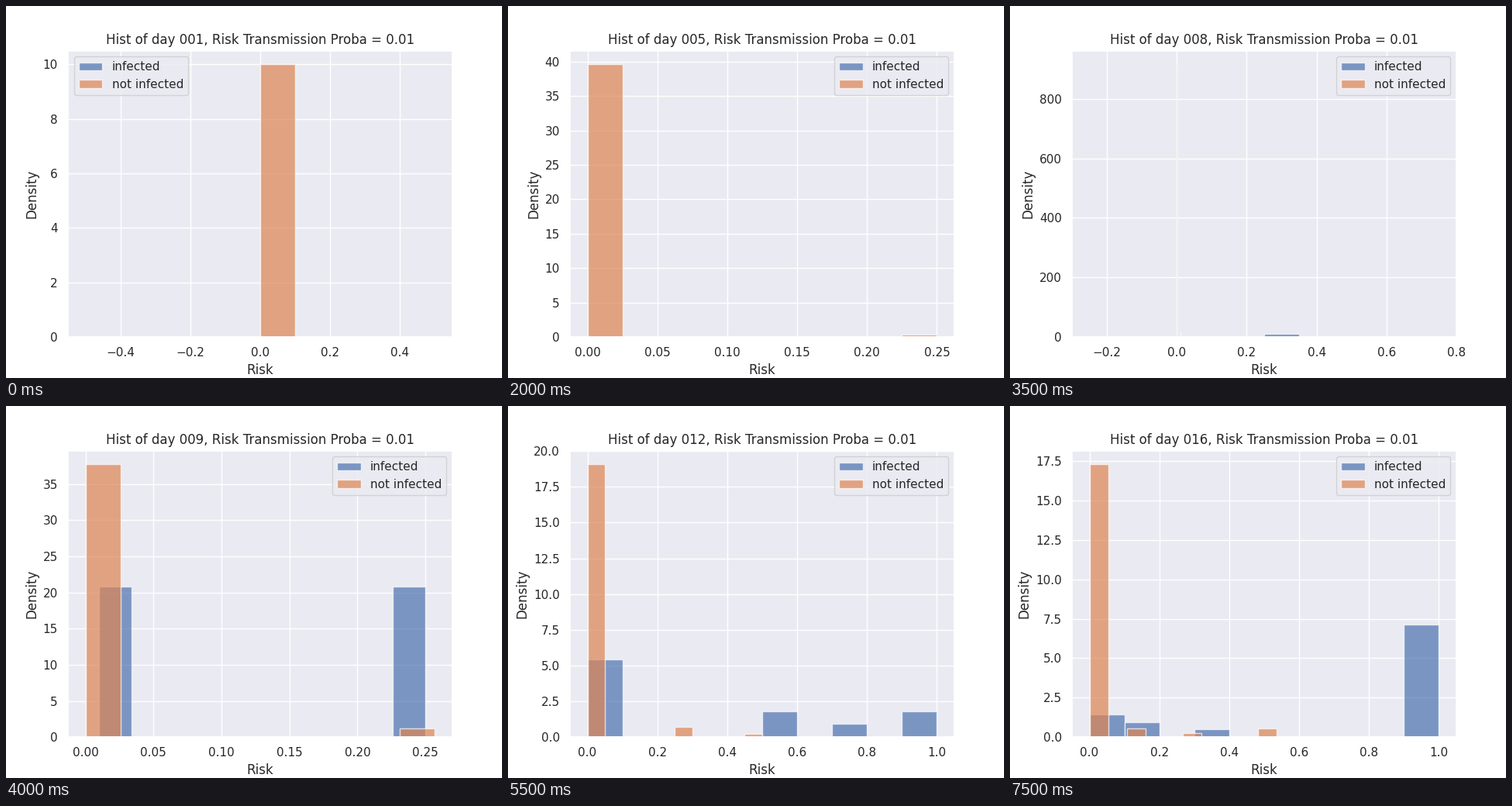
Recreate the animation shown at these times as a matplotlib script. Size 640x480 px, loop 8000 ms.

```python
import numpy as np
import matplotlib.pyplot as plt
from matplotlib.animation import FuncAnimation
from matplotlib.patches import Patch

plt.rcParams.update({
    "font.family": "DejaVu Sans",
    "text.color": ".15",
    "axes.labelcolor": ".15",
    "axes.facecolor": "#EAEAF2",
    "axes.edgecolor": "white",
    "axes.linewidth": 1.25,
    "axes.grid": True,
    "axes.axisbelow": True,
    "axes.titlesize": 12,
    "axes.labelsize": 12,
    "grid.color": "white",
    "grid.linewidth": 1,
    "xtick.color": ".15",
    "ytick.color": ".15",
    "xtick.labelsize": 11,
    "ytick.labelsize": 11,
    "xtick.major.size": 6,
    "ytick.major.size": 6,
    "xtick.bottom": False,
    "ytick.left": False,
    "legend.fontsize": 11,
    "patch.linewidth": 1,
})

GROUPS = {"infected": "#4C72B0", "not infected": "#DD8452"}
STYLE = dict(alpha=0.7, edgecolor="white")
DAYS = 16
QUANTILES = 10000


def crowd(size, exposed=None, base=0.0):
    """Sorted risks of a group: {risk: people} for the exposed, base for the rest."""
    exposed = exposed or {}
    risks = [base] * (size - sum(exposed.values()))
    for risk, people in sorted(exposed.items()):
        risks += [risk] * people
    # Resampled to quantiles, so that groups of any size can be blended
    return np.array(risks)[np.arange(QUANTILES) * size // QUANTILES]


NOBODY = np.array([])

# Key days of the epidemic: (infected, not infected)
KEYS = {
    1: (NOBODY, crowd(100)),
    4: (NOBODY, crowd(100)),
    5: (NOBODY, crowd(100, {0.25: 1})),
    7: (NOBODY, crowd(95, {0.25: 1})),
    8: (crowd(1, base=0.25), crowd(99, {0.0107: 2})),
    9: (crowd(2, {0.25: 1}, base=0.0098), crowd(98, {0.257: 3})),
    12: (crowd(11, {0.55: 2, 0.75: 1, 1: 2}), crowd(87, {0.27: 3, 0.5: 1})),
    14: (crowd(20, {0.28: 1, 0.47: 1, 1: 8}, base=0.0455),
         crowd(80, {0.04: 3, 0.07: 2, 0.125: 1, 0.15: 1, 0.24: 1, 0.279: 1})),
    16: (crowd(21, {0.15: 2, 0.35: 1, 1: 15}),
         crowd(68, {0.13: 2, 0.3: 1, 0.5356: 2})),
}


def risks_on(day):
    """Risks of both groups, each quantile easing from key day to key day."""
    before = max(k for k in KEYS if k <= day)
    after = min(k for k in KEYS if k >= day)
    if before == after:
        return KEYS[day]
    ease = ((day - before) / (after - before)) ** 0.7
    return [a + (b - a) * ease for a, b in zip(KEYS[before], KEYS[after])]


fig, ax = plt.subplots(figsize=(6.4, 4.8), dpi=100)


def update(i):
    day = i + 1
    ax.clear()
    for risks, color in zip(risks_on(day), GROUPS.values()):
        if risks.size:
            ax.hist(risks, bins=10, density=True, color=color, **STYLE)
    ax.set_title(f"Hist of day {day:03d}, Risk Transmission Proba = 0.01")
    ax.set_xlabel("Risk")
    ax.set_ylabel("Density")
    handles = [Patch(facecolor=color, label=name, **STYLE)
               for name, color in GROUPS.items()]
    # The legend keeps clear of the tall bar
    centred = ax.get_xlim()[0] < -0.5
    ax.legend(handles=handles, loc="upper left" if centred else "upper right")
    return []


anim = FuncAnimation(fig, update, frames=DAYS, init_func=lambda: [],
                     interval=500, repeat=True, repeat_delay=0, blit=False)
plt.show()
```
